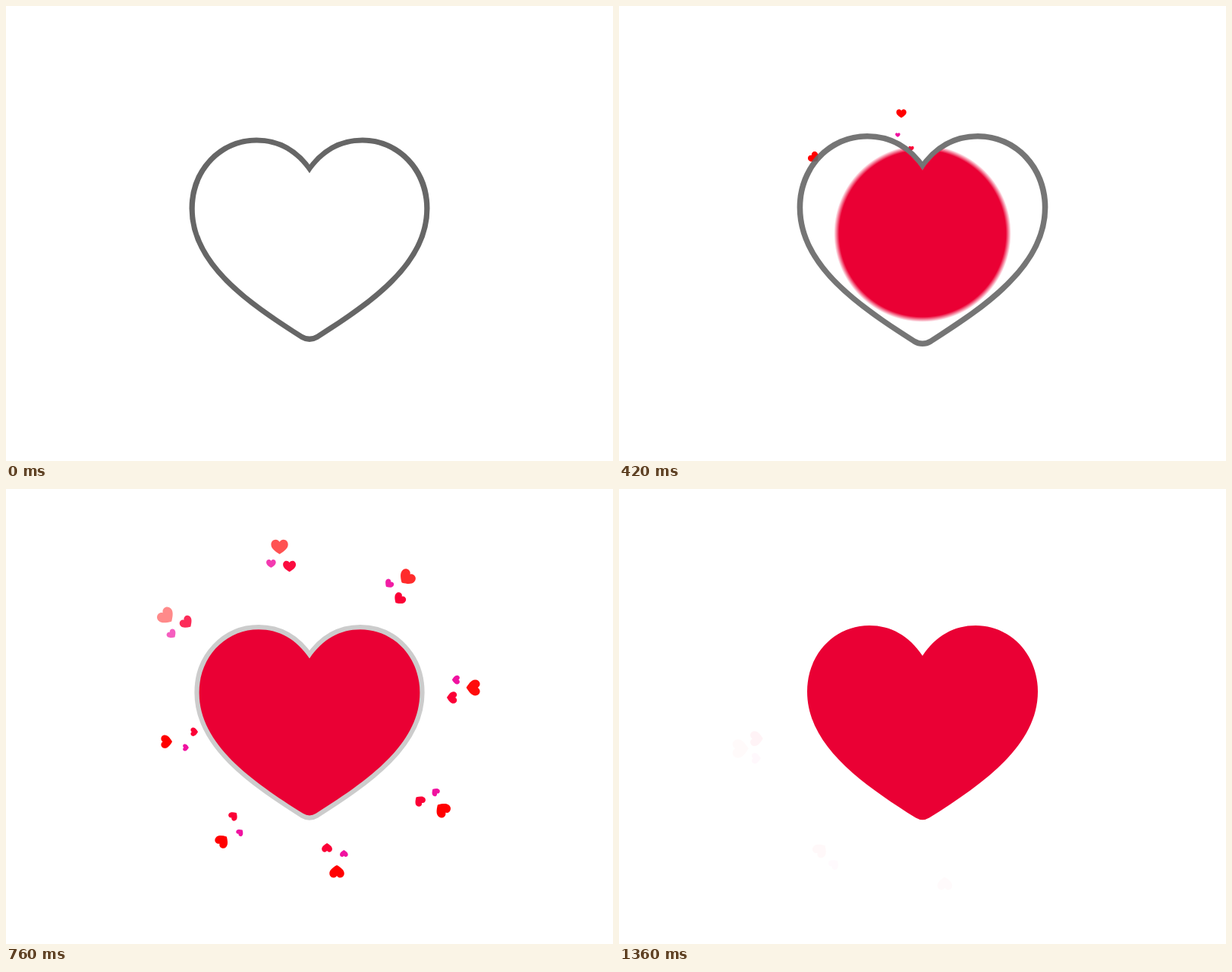
Animation, 800 px wide and 600 px high, one loop 1800 ms. Source, as an HTML page:

```html
<!DOCTYPE html>
<html lang="en">
<head>
<meta charset="utf-8">
<title>Heart burst</title>
<style>
html, body { margin: 0; width: 100%; height: 100%; overflow: hidden; background: #fff; }
svg { display: block; width: 100vw; height: 100vh; }
</style>
</head>
<body>
<svg viewBox="0 0 800 600">
  <defs>
    <path id="shape" d="M400 220C382 193 358 180 330 180C284 180 248 218 248 267C248 338.7 321 389 391 433.6Q400 439 409 433.6C479 389 552 338.7 552 267C552 218 516 180 470 180C442 180 418 193 400 220Z"/>
    <clipPath id="inside"><use href="#shape"/></clipPath>
    <radialGradient id="soft">
      <stop offset="0" stop-color="#ea0034"/>
      <stop id="edge" offset="1" stop-color="#ea0034"/>
      <stop offset="1" stop-color="#ea0034" stop-opacity="0"/>
    </radialGradient>
  </defs>
  <g id="burst"></g>
  <g id="heart">
    <use id="ring" href="#shape" fill="none" stroke="#666" stroke-width="13"/>
    <use id="body" href="#shape"/>
    <g clip-path="url(#inside)"><circle id="disc" cx="400" cy="300" fill="url(#soft)"/></g>
  </g>
</svg>
<script>
const LOOP = 1800, HOLD = 1360, STEP = 20;
const RED = '#ea0034';
const $ = id => document.getElementById(id);
const clamp = x => Math.min(1, Math.max(0, x));
const smooth = x => (1 - Math.cos(Math.PI * x)) / 2;
const linear = x => x;
const zoom = s => `translate(400 300) scale(${s}) translate(-400 -300)`;

// Value at time t between [time, value] keys
function track(keys, t, ease = linear) {
  if (t <= keys[0][0]) return keys[0][1];
  for (let i = 1; i < keys.length; i++) {
    const [t0, a] = keys[i - 1], [t1, b] = keys[i];
    if (t <= t1) return a + (b - a) * ease((t - t0) / (t1 - t0));
  }
  return keys[keys.length - 1][1];
}

const BEAT = [[0, 1], [360, 1.05], [720, 0.95], [900, 1.007], [1040, 1]];
const FADE = [[625, 1], [680, 0.83], [720, 0.68], [760, 0.46], [800, 0.31], [840, 0.22],
  [880, 0.14], [960, 0.07], [1040, 0.028], [1080, 0.018], [1120, 0]];

// Three hearts per spoke: heading in degrees, final distance, width, delay
const KINDS = [
  { color: '#ff0000', angle: -10, reach: 245, width: 25, delay: 0 },
  { color: '#f012a0', angle: -14.1, reach: 228, width: 14.5, delay: 40 },
  { color: '#fb0036', angle: -7.6, reach: 223.5, width: 20, delay: 80 }
];

const bits = [];
for (let i = 0; i < 8; i++) {
  for (const kind of KINDS) {
    const el = document.createElementNS('http://www.w3.org/2000/svg', 'use');
    el.setAttribute('href', '#shape');
    el.setAttribute('fill', kind.color);
    $('burst').append(el);
    bits.push({ ...kind, el, turn: i * 45 - 45, delay: kind.delay + i * 40 });
  }
}

function travel(t) {
  const v = t - 300;
  return clamp(1 - 0.494 * Math.exp(-v / 222 - (v / 790) ** 6));
}

function drawBit(bit, t) {
  const age = t - bit.delay;
  const k = travel(age);
  const a = bit.angle * Math.PI / 180;
  const x = bit.reach * k * Math.sin(a);
  const y = -bit.reach * k * Math.cos(a);
  const size = bit.width / 304 * k ** 1.5;
  const alpha = k > 0 ? track(FADE, age) : 0;
  bit.el.setAttribute('transform',
    `translate(400 300) rotate(${bit.turn}) translate(${x} ${y}) scale(${size}) translate(-400 -308.5)`);
  bit.el.setAttribute('opacity', alpha);
}

function draw(t) {
  const s = track(BEAT, t, smooth);
  $('heart').setAttribute('transform', zoom(s));
  $('ring').setAttribute('opacity', clamp((960 - t) / 600));

  // The disc grows until it covers the heart, its edge getting sharper
  const r = Math.max(0, (t - 183) * 0.478);
  const blur = Math.min(r / 2, Math.max(1, 5.5 - Math.max(0, t - 340) * 0.025));
  const full = r > 170;
  $('body').setAttribute('fill', full ? RED : '#fff');
  $('body').setAttribute('transform', zoom(full ? 1 : 0.995));
  $('disc').setAttribute('r', full || !r ? 0 : (r + blur) / s);
  $('edge').setAttribute('offset', r ? (r - blur) / (r + blur) : 0);

  for (const bit of bits) drawBit(bit, t);
}

const start = performance.now();
function frame() {
  const t = (performance.now() - start) % LOOP;
  draw(Math.min(HOLD, Math.floor(t / STEP) * STEP));
  requestAnimationFrame(frame);
}
frame();
</script>
</body>
</html>
```
